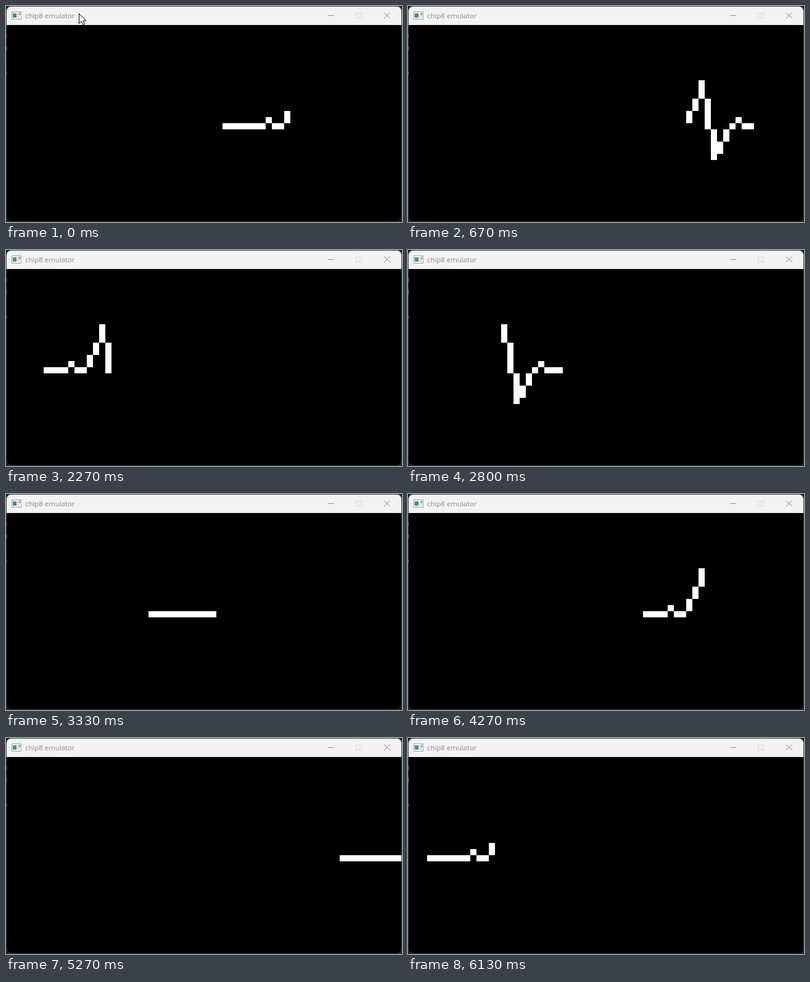
An HTML page with a canvas that plays this animation: 642 by 352 pixels, repeating every 6190 ms.

```html
<!DOCTYPE html>
<html lang="en">
<head>
<meta charset="utf-8">
<title>chip8 emulator</title>
<style>
  html, body { margin: 0; width: 100%; height: 100%; overflow: hidden; background: #10241a; }
  canvas { position: absolute; left: 0; top: 0; display: block; }
  #title {
    position: absolute; left: 31px; top: 8px; line-height: 16px; white-space: nowrap;
    font-family: "Open Sans", "Noto Sans", sans-serif; font-size: 11.4px; color: #8a8a8a;
  }
</style>
</head>
<body>
<canvas id="stage" width="642" height="352"></canvas>
<div id="title">chip8 emulator</div>
<script>
const ctx = document.getElementById("stage").getContext("2d");
const LOOP = 6190, STEP = 200 / 3, STEPS = 93;
const CELL = 10, COLS = 64, PERIOD = 32, BASE = 16;
const SPEED = 1.045, HEAD = 45.05, TAIL = 35.455;

// Heartbeat columns that leave the baseline: [top row, bottom row]
const BEAT = {
  10: [15, 15], 13: [14, 15], 14: [12, 13], 15: [9, 11], 16: [12, 16],
  17: [17, 21], 18: [19, 20], 19: [17, 18], 21: [15, 15]
};

function rect(x, y, w, h, color) {
  ctx.fillStyle = color;
  ctx.fillRect(x, y, w, h);
}

function path(points, close) {
  ctx.beginPath();
  points.forEach(([x, y]) => ctx.lineTo(x, y));
  if (close) ctx.closePath();
}

function stroke(color) {
  ctx.strokeStyle = color;
  ctx.lineWidth = 1;
  ctx.stroke();
}

function drawIcon() {
  rect(9, 9, 16, 13, "#9a9fa3");
  rect(10, 10, 14, 11, "#f8f8f8");
  rect(11, 12, 6, 7, "#4b8c8c");
  rect(18, 12, 3, 7, "#d3d8da");
  rect(21, 11, 2, 4, "#8f9aa0");
}

function drawButtons() {
  rect(522, 15, 10, 1, "#8c8c8c");
  ctx.strokeStyle = "#dadada";
  ctx.lineWidth = 1;
  ctx.strokeRect(567.5, 11.5, 9, 8);
  path([[613, 10.5], [623, 20]]);
  stroke("#868686");
  path([[623, 10.5], [613, 20]]);
  stroke("#868686");
}

function drawWindow() {
  rect(0, 0, 642, 352, "#10241a");
  ctx.beginPath();
  ctx.roundRect(0, 0, 642, 352, 8);
  ctx.fillStyle = "#284f34";
  ctx.fill();
  ctx.save();
  ctx.beginPath();
  ctx.roundRect(1, 1, 640, 350, 7);
  ctx.clip();
  rect(1, 1, 640, 350, "#000");
  rect(1, 1, 640, 30, "#f3f3f3");
  ctx.restore();
  rect(0, 46, 1, 6, "#a8746c");
  rect(0, 66, 1, 6, "#8a958c");
  rect(0, 107, 1, 5, "#5584b0");
  drawIcon();
  drawButtons();
}

function drawPointer() {
  path([[118.5, 12.5], [118.5, 28.5], [122.3, 25], [124.8, 30.5],
        [127.4, 29.4], [125, 24], [129.8, 24]], true);
  ctx.fillStyle = "#fff";
  ctx.fill();
  stroke("#000");
}

function drawTrace(step) {
  const first = Math.floor(TAIL + SPEED * step);
  const last = Math.floor(HEAD + SPEED * step);
  for (let c = first; c <= last; c++) {
    const [top, bottom] = BEAT[c % PERIOD] || [BASE, BASE];
    rect(1 + (c % COLS) * CELL, 31 + top * CELL, CELL, (bottom - top + 1) * CELL, "#fff");
  }
}

// Steps fall on 10 ms ticks
function stepAt(t) {
  let n = Math.min(STEPS - 1, Math.floor(t / STEP) + 1);
  while (Math.round(n * STEP / 10) * 10 > t) n--;
  return n;
}

const start = performance.now();

function draw() {
  const step = stepAt(Math.max(0, performance.now() - start) % LOOP);
  drawWindow();
  drawTrace(step);
  if (step === 0) drawPointer();
  requestAnimationFrame(draw);
}
draw();
</script>
</body>
</html>
```
